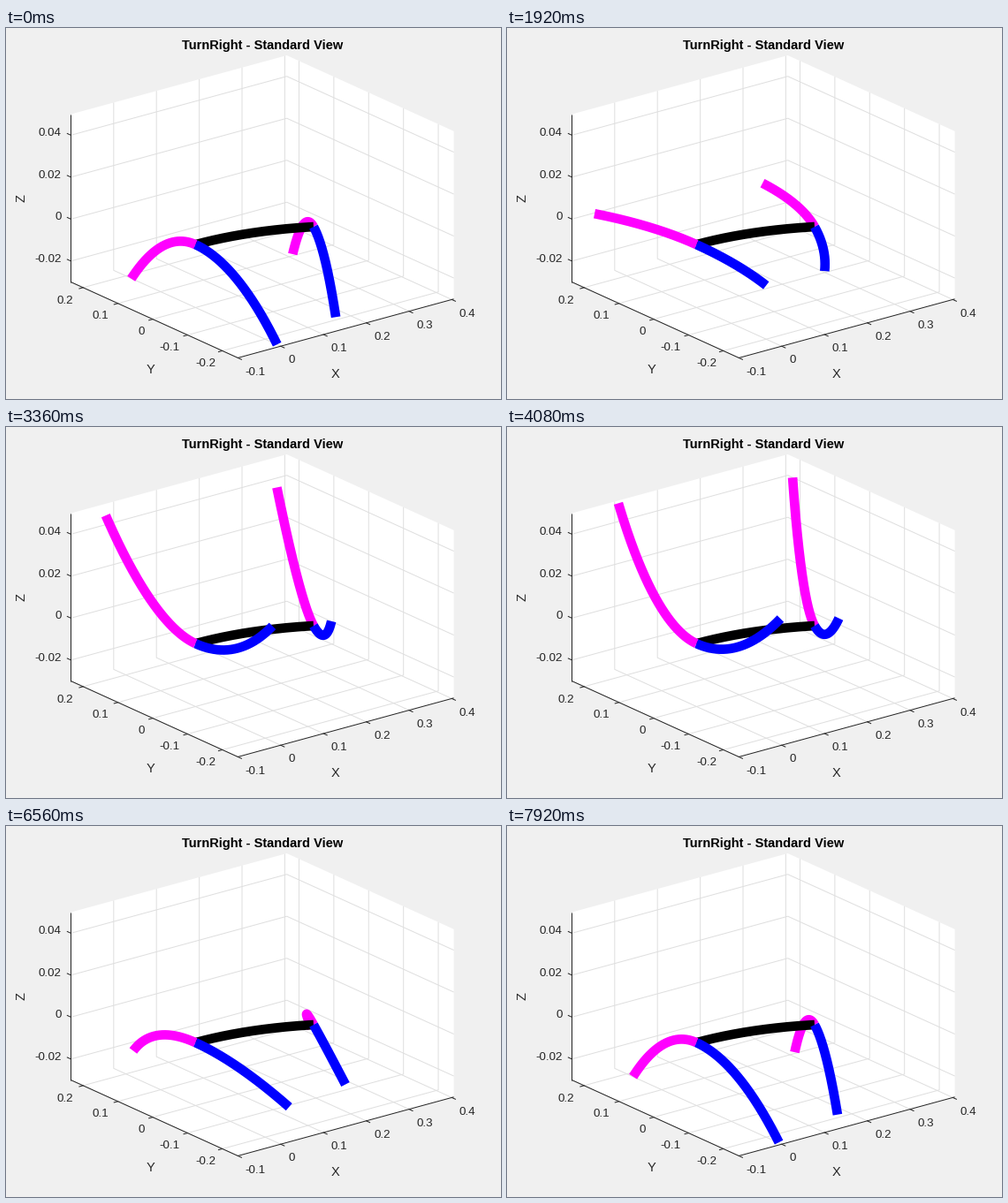
A matplotlib script that plays this animation: 560 px wide and 420 px high, repeating every 8 s.

```python
import numpy as np
import matplotlib.pyplot as plt
from matplotlib.animation import FuncAnimation

W, H, DPI = 560, 420, 100
FRAMES, INTERVAL = 100, 80
PT = 72 / DPI  # points per pixel

# Orthographic projection: screen pixels per data unit
ORIGIN = np.array([214.4, 245.2])
AXES = np.array([[484.0, -132.0], [-394.0, -179.0], [0.0, -2375.0]])
X0, X1 = -0.1, 0.4047
Y0, Y1 = -0.2445, 0.235
Z0, Z1 = -0.03, 0.05
X_TICKS = [-0.1, 0, 0.1, 0.2, 0.3, 0.4]
Y_TICKS = [-0.2, -0.1, 0, 0.1, 0.2]
Z_TICKS = [-0.02, 0, 0.02, 0.04]

INK, GRID = "#262626", "#dfdfdf"
BLUE, MAGENTA = "#0000ff", "#ff00ff"
TICK = 4.5

LENGTH = 0.239
BODY_ANGLE = 0.484
REAR_ANGLE = 0.42   # bend of the magenta legs
FRONT_ANGLE = 0.25  # bend of the blue legs
S = np.linspace(0, 1, 300)

plt.rcParams["font.family"] = "Liberation Sans"
fig = plt.figure(figsize=(W / DPI, H / DPI), dpi=DPI, facecolor="#f0f0f0")
ax = fig.add_axes([0, 0, 1, 1])
ax.set_xlim(0, W)
ax.set_ylim(H, 0)
ax.axis("off")


def project(points):
    return ORIGIN + np.asarray(points, float) @ AXES


def path(points, color, z):
    p = project(points)
    ax.plot(p[:, 0], p[:, 1], color=color, lw=PT, zorder=z,
            solid_capstyle="butt")


def tick(p, axis, sign):
    step = sign * AXES[axis] / np.hypot(*AXES[axis]) * TICK
    ax.plot([p[0], p[0] + step[0]], [p[1], p[1] + step[1]],
            color=INK, lw=PT, zorder=3)


def label(x, y, text, size=13.33, ha="center", color=INK, **kw):
    # y is the middle of the digits or capitals
    ax.text(x, y + 0.34 * size, text, fontsize=size * PT, ha=ha,
            va="baseline", color=color, zorder=3, **kw)


def draw_box():
    outline = [(X0, Y1, Z0), (X0, Y1, Z1), (X1, Y1, Z1),
               (X1, Y0, Z1), (X1, Y0, Z0), (X0, Y0, Z0)]
    ax.add_patch(plt.Polygon(project(outline), fc="white", ec="none", zorder=1))

    for x in X_TICKS:
        path([(x, Y0, Z0), (x, Y1, Z0), (x, Y1, Z1)], GRID, 2)
        p = project((x, Y0, Z0))
        tick(p, 1, -1)
        label(p[0] + 8.5, p[1] + 14.6, f"{x:g}", ha="left")
    for y in Y_TICKS:
        path([(X0, y, Z0), (X1, y, Z0), (X1, y, Z1)], GRID, 2)
        p = project((X0, y, Z0))
        tick(p, 0, -1)
        label(p[0] - 9.4 - 9 * y, p[1] + 13.2, f"{y:g}", ha="right")
    for z in Z_TICKS:
        path([(X0, Y1, z), (X1, Y1, z), (X1, Y0, z)], GRID, 2)
        p = project((X0, Y1, z))
        tick(p, 1, 1)
        label(62.5, p[1] - 3.6, f"{z:g}", ha="right")

    path([(X0, Y1, Z1), (X0, Y1, Z0)], INK, 3)
    path([(X0, Y1, Z0), (X0, Y0, Z0), (X1, Y0, Z0)], INK, 3)

    label(290, 18.6, "TurnRight - Standard View", 14.67,
          weight="bold", color="black")
    label(373, 391, "X", 14.67)
    label(163.8, 386, "Y", 14.67)
    ax.text(17.5, 192.5, "Z", fontsize=14.67 * PT, rotation=90,
            ha="center", va="center", color=INK)


def arc(start, along, side, angle):
    """Constant-curvature limb leaving start along one unit vector, bending to another."""
    t = (S * angle)[:, None]
    r = LENGTH / angle
    return start + r * (np.sin(t) * along + (1 - np.cos(t)) * side)


def clip(points):
    """Keep the part from the root to where the limb leaves the axes box."""
    out = (points[:, 2] < Z0 - 1e-4) | (points[:, 1] < Y0 + 0.0015)
    return points[:out.argmax()] if out.any() else points


def limb(color, z):
    return ax.plot([], [], color=color, lw=10.67 * PT, zorder=z,
                   solid_capstyle="butt", solid_joinstyle="round")[0]


def put(line, points):
    p = project(points)
    line.set_data(p[:, 0], p[:, 1])


draw_box()

UP = np.array([0.0, 0.0, 1.0])
EAST = np.array([1.0, 0.0, 0.0])
NORTH = np.array([0.0, 1.0, 0.0])
c, s = np.cos(BODY_ANGLE), np.sin(BODY_ANGLE)

body_points = arc(np.zeros(3), EAST, -NORTH, BODY_ANGLE)
body = limb("black", 6)
put(body, body_points)

# Each leg: line, root, forward axis, outward axis, bend angle
head_fwd, head_left = np.array([c, -s, 0]), np.array([s, c, 0])
legs = [
    (limb(MAGENTA, 5), body_points[-1], head_fwd, head_left, REAR_ANGLE),
    (limb(MAGENTA, 7), body_points[0], EAST, NORTH, REAR_ANGLE),
    (limb(BLUE, 8), body_points[-1], head_fwd, -head_left, FRONT_ANGLE),
    (limb(BLUE, 8), body_points[0], EAST, -NORTH, FRONT_ANGLE),
]


def update(k):
    phase = 2 * np.pi * (k + 1) / FRAMES
    for line, root, fwd, out, angle in legs:
        side = -np.sin(phase) * fwd - np.cos(phase) * UP
        put(line, clip(arc(root, out, side, angle)))
    return [leg[0] for leg in legs]


anim = FuncAnimation(fig, update, frames=FRAMES, interval=INTERVAL,
                     repeat=True, repeat_delay=0, blit=False)
plt.show()
```
